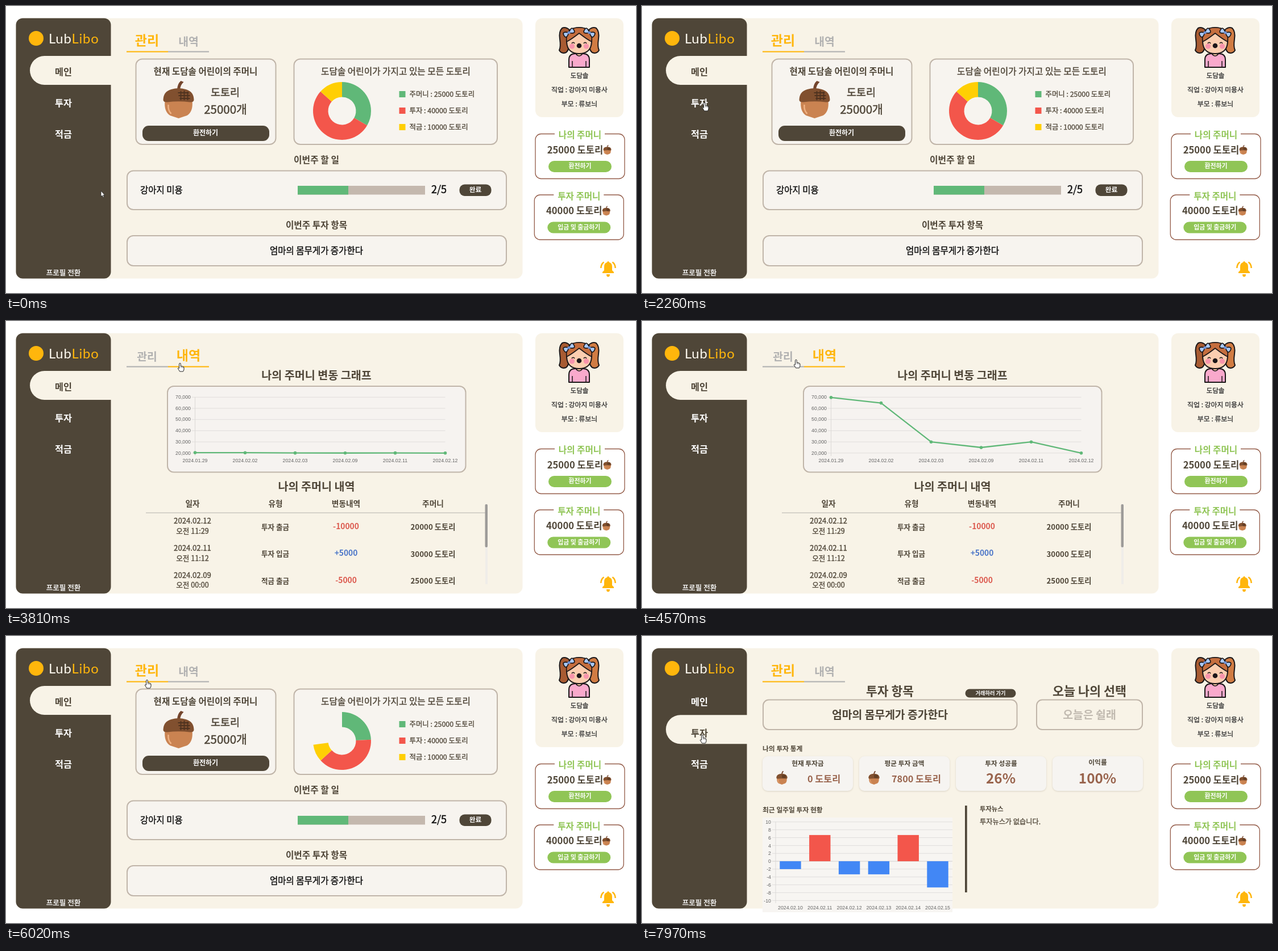
An HTML page with a canvas that plays this animation: 1108x506 px, repeating every 8 s.

```html
<!DOCTYPE html>
<html lang="ko">
<head>
<meta charset="utf-8">
<style>
html, body { margin: 0; width: 100%; height: 100%; overflow: hidden; background: #fff; }
canvas { display: block; }
</style>
</head>
<body>
<canvas id="stage" width="1108" height="506"></canvas>
<script>
const ctx = document.getElementById('stage').getContext('2d');
const LOOP = 8000, STEP = 66.75;
const DARK = '#4f4638', CREAM = '#f8f3e7', CARD = '#f7f4ef', EDGE = '#c0b5a9', YELLOW = '#ffb60c',
  GRAY = '#b1b1b1', GREEN = '#60b878', RED = '#f3564b', LIME = '#90c556', RUST = '#99644d';
const KOREAN = '"Noto Sans CJK KR", "Noto Sans CJK", sans-serif';
const ARIAL = '"Liberation Sans", Arial, sans-serif';
const LATIN = 'Lato, sans-serif';

function text(str, x, y, size, color = DARK, weight = 700, align = 'center', family = KOREAN) {
  ctx.font = `${weight} ${size}px ${family}`;
  ctx.textAlign = align;
  ctx.fillStyle = color;
  ctx.fillText(str, x, y + size * 0.37);
  if (weight === 500) { // thicken the regular face to a medium
    ctx.strokeStyle = color;
    ctx.lineWidth = size * 0.025;
    ctx.strokeText(str, x, y + size * 0.37);
  }
}

function box(x1, y1, x2, y2, radius, fill, stroke, width = 2) {
  ctx.beginPath();
  ctx.roundRect(x1, y1, x2 - x1, y2 - y1, radius);
  if (fill) { ctx.fillStyle = fill; ctx.fill(); }
  if (stroke) { ctx.strokeStyle = stroke; ctx.lineWidth = width; ctx.stroke(); }
}

function rect(x1, y1, x2, y2, color) {
  ctx.fillStyle = color;
  ctx.fillRect(x1, y1, x2 - x1, y2 - y1);
}

function shape(d, fill, stroke, width = 1) {
  const path = new Path2D(d);
  if (fill) { ctx.fillStyle = fill; ctx.fill(path); }
  if (stroke) { ctx.strokeStyle = stroke; ctx.lineWidth = width; ctx.stroke(path); }
}

function dot(x, y, r, color) {
  ctx.beginPath();
  ctx.arc(x, y, r, 0, Math.PI * 2);
  ctx.fillStyle = color;
  ctx.fill();
}

function at(x, y, scale, draw) {
  ctx.save();
  ctx.translate(x, y);
  ctx.scale(scale, scale);
  draw();
  ctx.restore();
}

const clamp = v => Math.min(1, Math.max(0, v));
const outQuart = v => 1 - (1 - clamp(v)) ** 4;
const smooth = v => v * v * (3 - 2 * v);

function acorn(x, y, scale) {
  at(x, y, scale, () => {
    shape('M-24 2 Q-26 21 -15 28 Q-6 31 0 33 Q6 31 15 28 Q26 21 24 2Z', '#ca8351');
    shape('M-18 9 Q-19 19 -13 25', null, '#efb182', 2.6);
    shape('M-2.5 -18 Q-2 -28 4 -33 L9 -31 Q2.5 -25 3 -18Z', '#74452d');
    shape('M-27 1 Q-27 -14 -13 -18 Q0 -22 13 -18 Q27 -14 27 1 Q26 5 20 4.5 Q0 2 -20 4.5 Q-26 5 -27 1Z', '#81502f');
    shape('M-1 -12H18 M0 -7H20 M2 -2H20 M4 -15V1 M10 -16V1 M16 -14V1', null, '#4e321f', 1.8);
  });
}

function girl() {
  const ink = '#1b1719';
  ctx.lineJoin = 'round';
  for (const side of [-1, 1]) {
    ctx.save();
    ctx.translate(1008, 0);
    ctx.scale(side, 1);
    shape('M17 42 Q24 36 30 39 Q36 45 34 58 Q32 72 35 78 Q31 85 23 82 Q16 77 20 62Z', side < 0 ? '#a85b32' : '#d17c43', ink, 2);
    ctx.restore();
  }
  shape('M990 108 V95 Q990 84 1001 84 H1015 Q1026 84 1026 95 V108Z', '#f9a9cc', ink, 2);
  shape('M1002 84 Q1008 92 1014 84Z', '#f8c9a6', ink, 1.5);
  shape('M996 97V108 M1020 97V108', null, ink, 1.5);
  shape('M986 63 Q984 38 1008 38 Q1032 38 1030 63 Q1029 84 1008 84 Q987 84 986 63Z', '#fbceb0', ink, 2);
  shape('M986 63 Q983 38 1008 38 Q1033 38 1030 63 Q1022 59 1008 48 Q994 59 986 63Z', '#c56e3e', ink, 1.6);
  dot(995.5, 71, 4.6, '#f794ac');
  dot(1020.5, 71, 4.6, '#f794ac');
  shape('M995 66 Q997.5 62.5 1000 66 M1016 66 Q1018.5 62.5 1021 66', null, ink, 1.7);
  dot(1008, 70, 4.3, ink);
  for (const side of [-1, 1]) {
    ctx.save();
    ctx.translate(1008 + side * 18, 47);
    ctx.rotate(side * 0.5);
    shape('M0 0 Q-10 -9 -10 0 Q-10 9 0 0 Q10 -9 10 0 Q10 9 0 0Z', '#a9c8f5', ink, 1.7);
    dot(0, 0, 2.5, '#6f91d5');
    ctx.restore();
  }
}

function bell() {
  shape('M1049 471 V469 L1052 466 V460 Q1052 453 1057 452 Q1059 448 1061 452 Q1066 453 1066 460 V466 L1069 469 V471Z', YELLOW);
  shape('M1056 473 H1062 Q1062 477.5 1059 477.5 Q1056 477.5 1056 473Z', YELLOW);
  shape('M1051.5 451.5 Q1046.5 455 1046.3 462 M1066.5 451.5 Q1071.5 455 1071.7 462', null, YELLOW, 2.6);
}

function pocket(x, y, title, amount, button) {
  box(x, y, x + 157, y + 79, 10, null, '#935b48', 1.3);
  rect(x + 34, y - 3, x + 122, y + 3, '#fff');
  text(title, x + 78.5, y + 2, 15.6, LIME);
  text(amount, x + 70, y + 28, 16.6);
  acorn(x + 126.5, y + 28, 0.26);
  box(x + 23, y + 47.5, x + 134, y + 67.5, 10, LIME);
  text(button, x + 78.5, y + 56.5, 10.9, '#fff');
}

function frame(active) {
  rect(0, 0, 1108, 506, '#fff');
  box(17.5, 21.5, 908.5, 480.5, 12, CREAM);
  box(17.5, 21.5, 184.5, 480.5, 12, DARK);
  dot(53, 57, 13, YELLOW);
  ctx.letterSpacing = '0.8px';
  text('Lub', 75, 57, 23.8, '#fffaf0', 400, 'left', LATIN);
  const width = ctx.measureText('Lub').width;
  text('Libo', 75 + width, 57, 23.8, YELLOW, 400, 'left', LATIN);
  ctx.letterSpacing = '0px';
  const top = 88 + active * 51.3;
  box(42, top, 185, top + 51, [25.5, 0, 0, 25.5], CREAM);
  ['메인', '투자', '적금'].forEach((name, i) =>
    text(name, 101, 116 + i * 55, 16.3, i === active ? DARK : '#fff'));
  text('프로필 전환', 101, 470, 12.5, '#fff', 500);

  box(931, 21.5, 1086, 196, 12, CREAM);
  girl();
  text('도담솔', 1008.5, 123, 11.6, '#333', 500);
  text('직업 : 강아지 미용사', 1008.5, 148, 11.9, '#333', 500);
  text('부모 : 류보늬', 1008.5, 173, 11.9, '#333', 500);
  pocket(931, 225.5, '나의 주머니', '25000 도토리', '환전하기');
  pocket(929.3, 333, '투자 주머니', '40000 도토리', '입금 및 출금하기');
  bell();
}

function tabs(selected) {
  ['관리', '내역'].forEach((name, i) => {
    const on = i === selected, x = i ? 321 : 248;
    text(name, x, on ? 60 : 63, on ? 23 : 19.3, on ? YELLOW : GRAY);
    rect(i ? 285 : 212, 79.5, i ? 357 : 285, 81.6, on ? YELLOW : GRAY);
  });
}

function donut(progress) {
  const parts = [[25, GREEN], [40, RED], [10, '#ffcf03']];
  let from = -Math.PI / 2;
  for (const [share, color] of parts) {
    const to = from + share / 75 * Math.PI * 2 * progress;
    ctx.beginPath();
    ctx.arc(591, 185, 51, from, to);
    ctx.arc(591, 185, 24.5, to, from, true);
    ctx.fillStyle = color;
    ctx.fill();
    from = to;
  }
}

function mainPage(progress) {
  tabs(0);
  box(228.5, 93.5, 474.5, 244, 11, CARD, EDGE);
  text('현재 도담솔 어린이의 주머니', 351, 115.5, 15.6);
  acorn(303.5, 165, 1);
  text('도토리', 385.5, 152, 18.5, DARK, 500);
  text('25000개', 386, 182.5, 20.5, DARK, 500);
  box(240, 211, 463, 238, 11, DARK);
  text('환전하기', 351, 223.5, 12, '#fff');

  box(506.5, 93.5, 864, 244, 11, CARD, EDGE);
  text('도담솔 어린이가 가지고 있는 모든 도토리', 685.5, 115.5, 15.7, DARK, 500);
  if (progress > 0) donut(progress);
  [['주머니 : 25000', GREEN], ['투자 : 40000', RED], ['적금 : 10000', '#ffcf03']].forEach(([label, color], i) => {
    const y = 155.5 + i * 29;
    rect(691.5, y - 5.5, 702.5, y + 5.5, color);
    text(label + ' 도토리', 709.5, y, 12.4, DARK, 500, 'left');
  });

  text('이번주 할 일', 546, 271.5, 15.8);
  box(213, 290.5, 880, 359, 11, CARD, EDGE);
  text('강아지 미용', 236, 324, 15.5, '#111', 500, 'left');
  rect(513, 317, 737, 332.5, '#c4b8ae');
  rect(513, 317, 602, 332.5, GREEN);
  text('2/5', 761.5, 323, 18, '#111', 500);
  box(797.5, 314.5, 853.5, 335, 9, DARK);
  text('완료', 825.5, 324, 11.8, '#fff');
  text('이번주 투자 항목', 546, 386, 15.7);
  box(213, 405, 880, 458, 11, CARD, EDGE);
  text('엄마의 몸무게가 증가한다', 546, 431.5, 15.5, '#111', 500);
}

function lineChart(progress) {
  const dates = ['01.29', '02.02', '02.03', '02.09', '02.11', '02.12'];
  const values = [70, 65, 30, 25, 30, 20];
  const px = i => 332.5 + i * 88;
  for (let i = 0; i < 6; i++) {
    const y = 134.3 + i * 19.7;
    rect(327, y - 0.5, 772.5, y + 0.5, '#e1dedc');
    text(`${70 - i * 10},000`, 325, y - 0.5, 8.8, '#666', 400, 'right', ARIAL);
    text('2024.' + dates[i], px(i), 245.5, 8.8, '#666', 400, 'center', ARIAL);
  }
  rect(332, 134, 333, 238, '#dcd9d7');
  const points = values.map((v, i) => [px(i), 232.8 - (v - 20) * 1.97 * progress]);
  ctx.beginPath();
  points.forEach(p => ctx.lineTo(...p));
  ctx.strokeStyle = GREEN;
  ctx.lineWidth = 2.3;
  ctx.stroke();
  points.forEach(p => dot(...p, 2.8, GREEN));
}

function historyPage(loaded, progress) {
  tabs(1);
  text('나의 주머니 변동 그래프', 546, 96, 19.6);
  box(284, 115, 808.5, 266.5, 11, '#f6f3f0', EDGE);
  text('나의 주머니 내역', 546, 291.5, 19.6);
  [['일자', 328], ['유형', 474], ['변동내역', 598], ['주머니', 751]].forEach(([name, x]) => text(name, x, 322, 13.7));
  rect(246, 337.5, 843, 339, '#cbc7c0');
  if (!loaded) return;
  lineChart(progress);
  [['12', '11:29', '투자 출금', -10000, 20000], ['11', '11:12', '투자 입금', 5000, 30000],
   ['09', '00:00', '적금 출금', -5000, 25000]].forEach(([day, hour, kind, change, total], i) => {
    const y = 363 + i * 47.6;
    text('2024.02.' + day, 328, y - 10.5, 13.2, DARK, 500);
    text('오전 ' + hour, 328, y + 7.5, 12.6, DARK, 500);
    text(kind, 473.5, y, 12.6);
    text((change > 0 ? '+' : '') + change, 598, y - 1.5, 13.8, change > 0 ? '#4b75c8' : '#dc594e');
    text(total + ' 도토리', 751, y, 13.3);
  });
  rect(843, 323, 847, 464, '#efede9');
  box(842.5, 323, 847, 399, 2, '#9d9b99');
}

function barChart(progress) {
  rect(212, 320, 546, 487, '#f7f5f2');
  for (let i = 0; i <= 10; i++) {
    const y = 327.8 + i * 13.86;
    rect(229, y - 0.5, 546, y + 0.5, i === 5 ? '#d2d0ce' : '#e0dedc');
    text(String(10 - i * 2), 227, y, 8.8, '#666', 400, 'right', ARIAL);
  }
  rect(234.5, 327.5, 235.5, 471, '#dcdad8');
  [-3, 10, -5, -5, 10, -10].forEach((v, i) => {
    const x = 261 + i * 51.8, y = 397.1;
    rect(x - 18.7, y, x + 18.7, y - v * 6.93 * progress, v > 0 ? RED : '#4287f5');
    text('2024.02.' + (10 + i), x, 479, 8.8, '#666', 400, 'center', ARIAL);
  });
}

function statCard(x, title, titleY, value, valueX, nutX) {
  ctx.save();
  ctx.shadowColor = 'rgba(90,70,50,.18)';
  ctx.shadowBlur = 3;
  ctx.shadowOffsetY = 1;
  box(x, 212, x + 159, 273, 9, '#f6f4f1');
  ctx.restore();
  text(title, x + 79.5, titleY, 11.7);
  if (nutX) acorn(nutX, 250, 0.36);
  text(value, valueX, nutX ? 252 : 251, nutX ? 16.3 : 24.3, RUST);
}

function investPage(loaded, progress) {
  tabs(0);
  text('투자 항목', 436, 97, 21.5);
  box(568.5, 93.5, 657.5, 108.5, 7.5, DARK);
  text('거래하러 가기', 613, 101, 9.2, '#fff');
  text('오늘 나의 선택', 787, 97, 21.8);
  box(213, 112.5, 659.5, 165, 10, CREAM, EDGE);
  text('엄마의 몸무게가 증가한다', 436, 139, 19.3);
  box(694, 112.5, 880, 165, 10, CREAM, EDGE);
  text('오늘은 쉴래', 787, 139, 19.4, '#c1bab0');
  text('나의 투자 통계', 212, 199, 11.8, DARK, 700, 'left');
  statCard(212, '현재 투자금', 225, '0 도토리', 320, 246);
  statCard(382, '평균 투자 금액', 225, '7800 도토리', 482.5, 408);
  statCard(552, '투자 성공률', 225, '26%', 631);
  statCard(722, '이익률', 222.5, '100%', 801);
  text('최근 일주일 투자 현황', 212, 307, 11.8, DARK, 700, 'left');
  rect(568, 299, 571.7, 452, DARK);
  text('투자뉴스', 594, 304.5, 11.3, DARK, 700, 'left');
  text('투자뉴스가 없습니다.', 594, 327, 12.2, DARK, 500, 'left');
  if (loaded) barChart(progress);
}

// start, end, x, y, then optional curve controls
const moves = [
  [67, 868, 288, 244],
  [1000, 1935, 117, 166, 390, 200, 240, 110],
  [2070, 2270, 110, 171],
  [2400, 2937, 306, 75],
  [4200, 4740, 255, 66],
  [5500, 5990, 248, 78],
  [6041, 7209, 106, 170, 230, 150, 180, 165],
  [7560, 7850, 106, 175]
];

function pointer(t) {
  let x = 167, y = 326;
  for (const [start, end, tx, ty, ax, ay, bx, by] of moves) {
    if (t <= start) break;
    const u = clamp((t - start) / (end - start)), v = 1 - u;
    const curve = (p, a, b, q) => a === undefined ? p + (q - p) * smooth(u)
      : p * v ** 3 + 3 * a * u * v * v + 3 * b * u * u * v + q * u ** 3;
    x = curve(x, ax, bx, tx);
    y = curve(y, ay, by, ty);
  }
  return [x, y];
}

function cursor(t) {
  const [x, y] = pointer(t);
  const pressed = [[3260, 3400], [5060, 5460], [7400, 7530]].some(([a, b]) => t >= a && t < b);
  if (pressed) dot(x + 0.3, y + 0.5, 9, 'rgba(250,245,0,.52)');
  const overTab = x > 212 && x < 357 && y > 45 && y < 84;
  const overMenu = x < 116 && y > 160 && y < 185;
  at(x, y, 1, () => {
    ctx.lineJoin = 'round';
    if (overTab || overMenu) {
      shape('M-1.4 8 V.8 Q-1.3 -.6 0 -.6 Q1.3 -.6 1.3 .8 V4.6 Q5.5 4.5 7 6.6 V10 Q6.8 12 5.5 14 H-.5 Q-2 11 -3.8 8.6 Q-3.4 6.8 -1.4 8.4Z', '#fff', '#222', 1);
      shape('M1.5 5V7.5 M3.5 5.4V7.5 M5.3 6V8', null, '#555', 0.7);
    } else {
      shape('M0 0 V10 L2.3 8 L3.8 11.5 L5.4 10.8 L4 7.4 H6.8Z', '#fff', '#222', 0.8);
    }
  });
}

function draw(time) {
  const t = Math.floor((time % LOOP + 12) / STEP) * STEP;
  const since = start => outQuart((t - start) / 1000);
  frame(t < 7530 ? 0 : 1);
  if (t < 3400) mainPage(1);
  else if (t < 5460) historyPage(t >= 3800, since(3803));
  else if (t < 7530) mainPage(since(5729));
  else investPage(t >= 7670, since(7703));
  cursor(t);
}

let origin;
function tick(now) {
  origin ??= now;
  draw(now - origin);
  requestAnimationFrame(tick);
}
requestAnimationFrame(tick);
</script>
</body>
</html>
```
